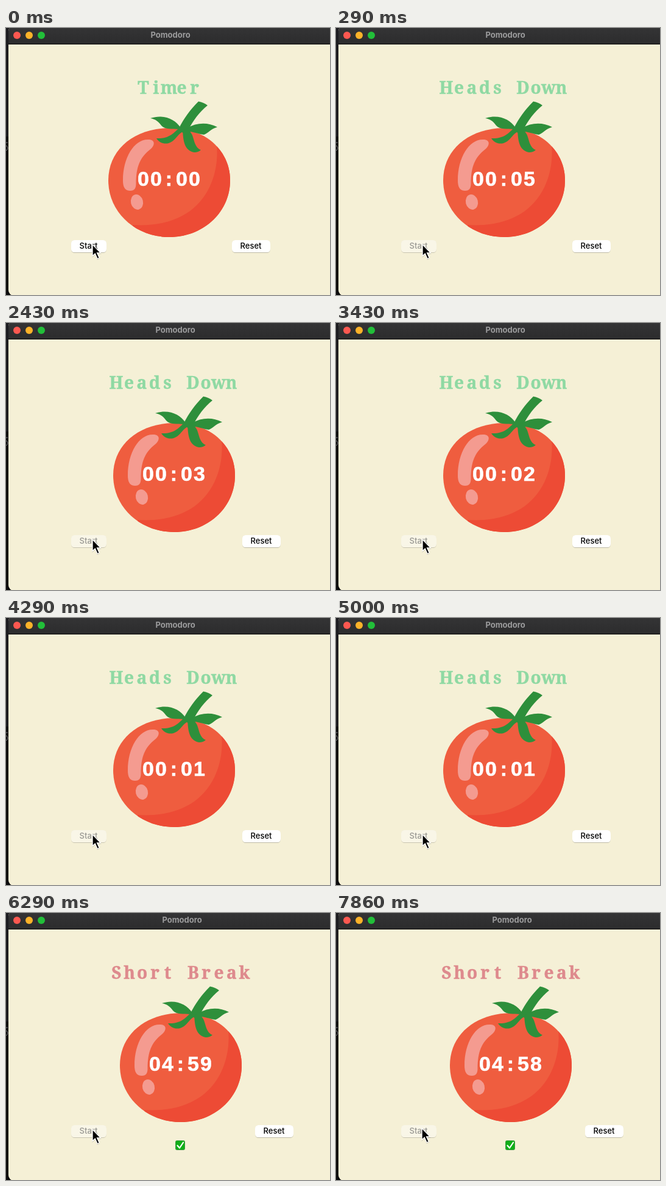
Animation of 532x438 px, one loop 8 s. Source, as an HTML page:

```html
<!DOCTYPE html>
<html lang="en">
<head>
<meta charset="utf-8">
<title>Pomodoro</title>
<style>
html, body { margin: 0; width: 100%; height: 100%; overflow: hidden; background: #0b0b0d; }
svg { display: block; width: 532px; height: 438px; }
text { text-anchor: middle; }
.ui { font: 500 13px Inter, "Liberation Sans", sans-serif; }
.bar { font: 700 13px Inter, "Liberation Sans", sans-serif; fill: #9c9c9d; }
.title { font: bold 28px "Noto Serif", serif; stroke-width: .5; }
.time { font: bold 34px "Liberation Sans", sans-serif; fill: #fff; stroke: #fff; stroke-width: .6; }
</style>
</head>
<body>
<svg viewBox="0 0 532 438" xmlns="http://www.w3.org/2000/svg">
  <defs>
    <path id="body" d="M268 164C209 165 168 200 168 250C168 302 212 343 268 343C324 343 368 302 368 250C368 221 354 197 331 181C314 170 294 164 268 164Z"/>
    <clipPath id="skin"><use href="#body"/></clipPath>
    <clipPath id="window"><rect x="4" y="-4" width="560" height="443" rx="9"/></clipPath>
    <linearGradient id="chrome" x2="0" y2="1">
      <stop stop-color="#343435"/><stop offset="1" stop-color="#2c2c2d"/>
    </linearGradient>
    <filter id="drop" x="-50%" y="-50%" width="200%" height="200%">
      <feDropShadow dx="0" dy=".7" stdDeviation=".7" flood-opacity=".32"/>
    </filter>
  </defs>

  <rect width="4" height="178" fill="#1c1c20"/>
  <path d="M0 188h3M0 193q3 1 3 4t-3 4" fill="none" stroke="#77777a"/>

  <g clip-path="url(#window)">
    <rect x="4" width="528" height="438" fill="#f5f0d6"/>
    <rect x="4" width="528" height="26" fill="url(#chrome)"/>
    <rect x="4" y="26" width="528" height="1" fill="#060606"/>
  </g>
  <circle cx="18" cy="12" r="6" fill="#fc5850"/>
  <circle cx="38" cy="12" r="6" fill="#fcb229"/>
  <circle cx="58" cy="12" r="6" fill="#22bf39"/>

  <g id="middle">
    <text class="bar" x="270" y="16">Pomodoro</text>
    <text class="title" id="title" y="108"></text>
    <use href="#body" fill="#ef5d3f"/>
    <path clip-path="url(#skin)" fill="#ed4b35" d="M346 192C350 238 332 279 301 301C273 320 242 325 208 323V345H370V192Z"/>
    <g fill="#f49b90">
      <path d="M234 183C211 182 192 212 192 250C192 262 196 267 204 267C211 267 213.500 263 213.500 255C213.500 228 220 212 237 199C246 191 244 183 234 183Z"/>
      <ellipse cx="215" cy="285.500" rx="10" ry="12.500" transform="rotate(-14 215 285.500)"/>
    </g>
    <g fill="#2e8f3b">
      <path d="M316 120.500Q325 122 331 127C318 137 307 152 299 168L290 172L284 164C292 149 302 134 316 120.500Z"/>
      <path d="M237 148C258 141 278 149 287 164L284 166C273 165 261 167 255 160C250 153 246 150 237 148Z"/>
      <path d="M297 164C313 155 331 154 347 162.500C335 166 333 172 325 175C314 174 306 169 296 170Z"/>
      <path d="M284 164C275 173 267 182 247 181C252 189 263 193 273 186C281 180 282 174 292 169Z"/>
      <path d="M290 167C291 180 291 201 309 204Q316 204 320 200C309 196 309 181 305 174L299 165Z"/>
    </g>
    <text class="time" id="time" y="259"></text>
  </g>

  <g id="start" class="ui">
    <rect x="107" y="348" width="58" height="20" rx="5.500" filter="url(#drop)"/>
    <text x="135.500" y="362">Start</text>
  </g>
  <g id="reset" class="ui">
    <rect x="371" y="348" width="63" height="20" rx="5.500" fill="#fff" filter="url(#drop)"/>
    <text x="402" y="362">Reset</text>
  </g>

  <g id="check">
    <rect x="278" y="373" width="16" height="16" rx="3" fill="#3c9a43"/>
    <rect x="279" y="374" width="14" height="14" rx="2" fill="#0fae17"/>
    <path d="M281.500 381.500l3.500 4l6-9" fill="none" stroke="#fff" stroke-width="2.200" stroke-linecap="round" stroke-linejoin="round"/>
  </g>

  <path id="cursor" d="M0 0V19L4.300 15L8 23.500L11.200 22L7.500 13.800H13.200Z" stroke="#fff" stroke-width="1.300" filter="url(#drop)"/>
</svg>
<script>
const LOOP = 8000, BEGIN = 290, BREAK = BEGIN + 5000;
const CELL = 21; // width of one typewriter letter
const $ = id => document.getElementById(id);
const modes = {
  idle: { label: "Timer", color: "#8fd9a3", shift: 0, reset: 0 },
  work: { label: "Heads Down", color: "#8fd9a3", shift: 8, reset: 17 },
  rest: { label: "Short Break", color: "#de8a8d", shift: 19, reset: 38 }
};
const pad = n => String(n).padStart(2, "0");
const clock = s => pad(Math.floor(s / 60)) + ":" + pad(s % 60);
const move = (id, x, y = 0) => $(id).setAttribute("transform", `translate(${x} ${y})`);

function type(id, text) {
  const left = 267.5 - CELL * (text.length - 1) / 2;
  $(id).setAttribute("x", [...text].map((_, i) => left + CELL * i).join(" "));
  $(id).textContent = text;
}

function secondsLeft(t) {
  if (t < BEGIN) return 0;
  const passed = Math.floor((t - BEGIN) / 1000);
  return t < BREAK ? 5 - passed : 305 - passed;
}

function draw(t) {
  const name = t < BEGIN ? "idle" : t < BREAK ? "work" : "rest";
  const mode = modes[name], idle = name === "idle";
  type("title", mode.label);
  $("title").setAttribute("fill", mode.color);
  $("title").setAttribute("stroke", mode.color);
  type("time", clock(secondsLeft(t)));
  move("middle", mode.shift);
  move("reset", mode.reset);
  const [face, label] = $("start").children;
  face.setAttribute("fill", idle ? "#fff" : "#faf8ec");
  face.style.opacity = idle ? 1 : 0.8;
  label.setAttribute("fill", idle ? "#000" : "#989792");
  $("check").style.display = name === "rest" ? "" : "none";
  if (t < 7000) move("cursor", 142, 355);
  else move("cursor", 141, 353);
}

const born = performance.now();
function tick() {
  draw((performance.now() - born) % LOOP);
  requestAnimationFrame(tick);
}
draw(0);
tick();
</script>
</body>
</html>
```
